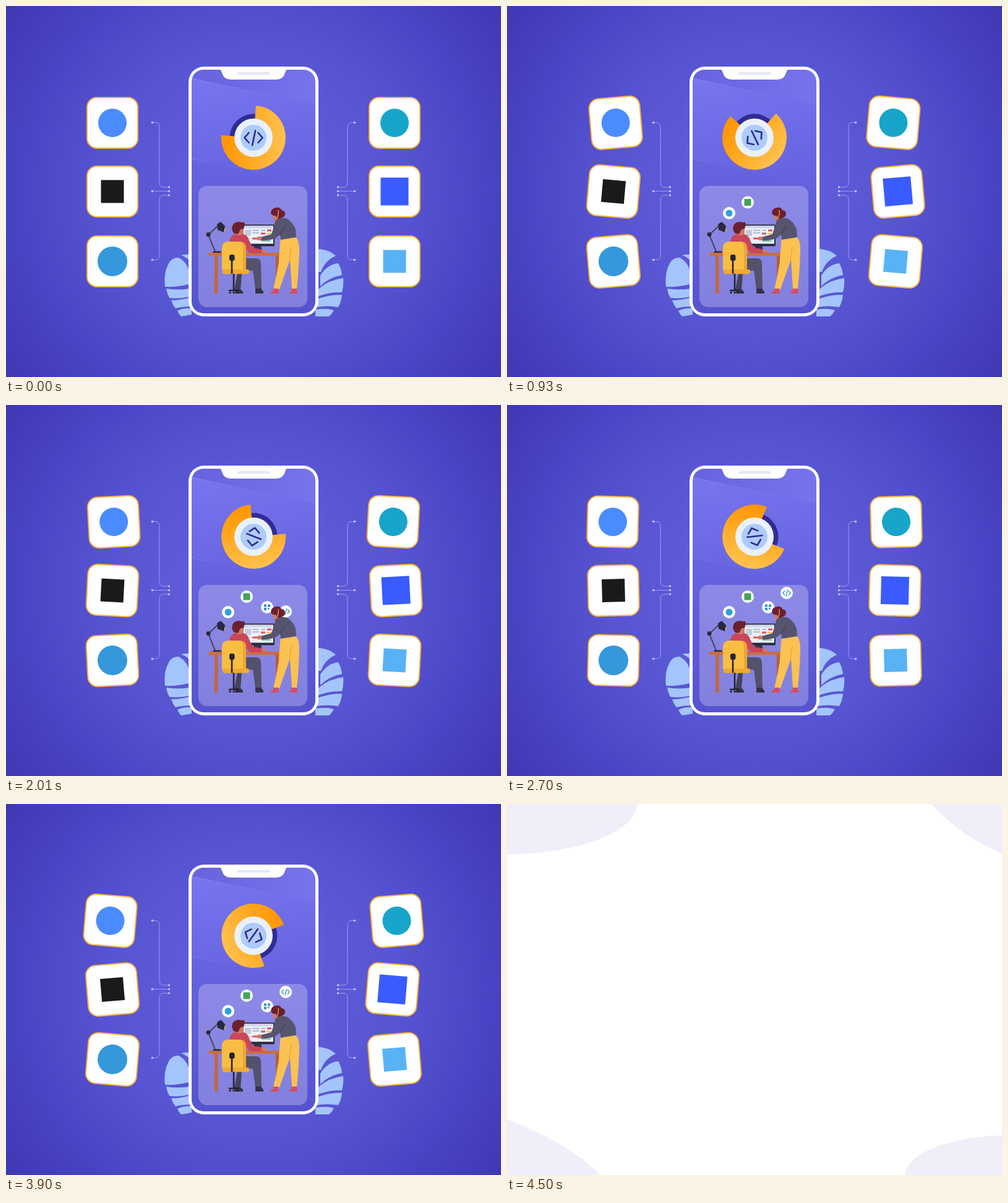
Write an HTML page that moves like this. It is 800 px wide and 600 px high and loops after 9470 ms.

```html
<!DOCTYPE html>
<html lang="en">
<head>
<meta charset="utf-8">
<title>App development</title>
<style>
html, body { margin: 0; width: 100%; height: 100%; overflow: hidden; background: #fff; }
svg { display: block; width: 100%; height: 100%; }
.wire { fill: none; stroke: #9c9af0; stroke-width: 1; }
.dot { fill: #c3c2fa; }
.leaf { fill: #a4c5fc; }
</style>
</head>
<body>
<svg viewBox="0 0 800 600">
  <defs>
    <radialGradient id="bg" gradientUnits="userSpaceOnUse" cx="400" cy="300" r="500">
      <stop offset="0" stop-color="#6462df"/>
      <stop offset=".48" stop-color="#5754d2"/>
      <stop offset=".76" stop-color="#4944c3"/>
      <stop offset="1" stop-color="#3f38b3"/>
    </radialGradient>
    <linearGradient id="top" x1="0" y1="0" x2="1" y2="0">
      <stop offset="0" stop-color="#6763df"/><stop offset="1" stop-color="#7674ed"/>
    </linearGradient>
    <linearGradient id="mid" x1="0" y1="0" x2=".2" y2="1">
      <stop offset="0" stop-color="#7875ef"/><stop offset="1" stop-color="#6663df"/>
    </linearGradient>
    <linearGradient id="low" x1="0" y1="0" x2="0" y2="1">
      <stop offset="0" stop-color="#6764e0"/><stop offset="1" stop-color="#5653d0"/>
    </linearGradient>
    <linearGradient id="gold" gradientUnits="userSpaceOnUse" x1="-52" y1="0" x2="52" y2="0">
      <stop offset="0" stop-color="#ff9500"/><stop offset="1" stop-color="#ffc24d"/>
    </linearGradient>
    <clipPath id="screen"><rect x="300" y="103" width="200" height="394" rx="19"/></clipPath>
    <g id="wires">
      <path class="wire" d="M236 188.500h5q7 0 7 7V286q0 7 7 7h9M236 299.500h28M264 306h-9q-7 0-7 7v90.500q0 7-7 7h-5"/>
      <g class="dot">
        <circle cx="236.500" cy="188.500" r="1.700"/><circle cx="263.500" cy="293" r="1.700"/>
        <circle cx="236.500" cy="299.500" r="1.700"/><circle cx="263.500" cy="299.500" r="1.700"/>
        <circle cx="263.500" cy="306" r="1.700"/><circle cx="236.500" cy="410.500" r="1.700"/>
      </g>
    </g>
    <path id="code" d="M-7.500-8L-14.500 0l7 8M7.500-8L14.500 0l-7 8M3-11.500L-2 12.500" fill="none" stroke-linecap="round" stroke-linejoin="round"/>
  </defs>

  <g id="scene">
    <rect width="800" height="600" fill="url(#bg)"/>

    <g class="leaf">
      <path d="M283 403q9-2 17-1v14q-6-9-17-13z"/>
      <path d="M257 454q-3-24 8-41q6-7 14-6q15 8 17 25l-1 18q-18 5-38 4z"/>
      <path d="M259 457q18 3 38 0v13q-17 4-33 2q-4-7-5-15z"/>
      <path d="M267 476q15 0 32-5v15q-15 0-25 3q-5-6-7-13z"/>
      <path d="M277 493q10-5 23-4v10q-9 2-17 3q-4-4-6-9z"/>
      <path d="M500 393q20-1 33 11q-18 8-24 26h-9z"/>
      <path d="M508 436q11-18 29-20q5 9 6 19q-21 4-35 18z"/>
      <path d="M503 460q15-16 42-20q1 13-2 23q-20-1-40 7z"/>
      <path d="M503 474q18-7 40-7q-1 11-6 20q-18-3-34 0z"/>
      <path d="M500 491q18-3 30 1q-3 6-8 10h-22z"/>
    </g>

    <use href="#wires"/>
    <use href="#wires" transform="translate(800) scale(-1 1)"/>

    <rect x="295" y="98" width="210" height="404" rx="25" fill="#fff"/>
    <g clip-path="url(#screen)">
      <path d="M300 100h200v60L300 117z" fill="url(#top)"/>
      <path d="M300 117l200 42v136L300 247z" fill="url(#mid)"/>
      <path d="M300 247l200 46v205H300z" fill="url(#low)"/>
    </g>
    <path d="M345 101h110q-3 3-4 7q-3 11-14 11h-74q-11 0-14-11q-1-4-4-7z" fill="#fff"/>
    <rect x="374" y="107" width="53" height="4" rx="2" fill="#e4e7f8"/>

    <g transform="translate(400 213)">
      <g id="ring">
        <circle r="38.500" fill="#302c94"/>
        <path d="M4-52A52 52 0 1 1-52-4L-30-2.300A30 30 0 1 0 2.300-30z" fill="url(#gold)"/>
      </g>
      <circle r="31" fill="#eaf1fd"/>
      <circle r="21" fill="#adcbfb"/>
      <g id="sign"><use href="#code" stroke="#2c2a88" stroke-width="2.600"/></g>
    </g>

    <rect x="311" y="291" width="176" height="196" rx="14" fill="#fff" fill-opacity=".26"/>
    <g id="bubbles"></g>

    <!-- monitor -->
    <path d="M401 387h11l2 10h-15z" fill="#34334a"/>
    <rect x="382" y="353.500" width="52" height="35" rx="2" fill="#29283d"/>
    <rect x="384" y="355.500" width="48" height="29" fill="#edf1f8"/>
    <rect x="384" y="355.500" width="48" height="4" fill="#cdd8ec"/>
    <rect x="386" y="362" width="10" height="10" fill="#c3cbdc"/>
    <path d="M398 363h11M398 367h11M413 363h6" stroke="#aebbd6" stroke-width="2"/>
    <path d="M412 368h7M422 363h7M398 376h9" stroke="#df5262" stroke-width="3"/>
    <path d="M421 368h9M386 376h8" stroke="#f4bd4f" stroke-width="2"/>
    <path d="M413 375h8M413 380h15" stroke="#7cc3a8" stroke-width="2"/>

    <!-- desk and lamp -->
    <rect x="337" y="403" width="5.500" height="62" fill="#c4653c"/>
    <rect x="436" y="403" width="5" height="52" fill="#b95c38"/>
    <rect x="327" y="399" width="115" height="5" fill="#cb6e42"/>
    <path d="M338 397l-11-27l17-16" fill="none" stroke="#46445c" stroke-width="2"/>
    <circle cx="327" cy="369.500" r="3.500" fill="#29283d"/>
    <path d="M341 353l6-4l7 7q2 6-2 10l-10-4z" fill="#29283d"/>
    <path d="M354 357q2 5-2 9z" fill="#f7d27c"/>
    <path d="M334 399q0-2.500 3-2.500h8q3 0 3 2.500z" fill="#29283d"/>

    <!-- seated man -->
    <path d="M374 432l7-14h12l-12 16l-2 25h-10z" fill="#454359"/>
    <path d="M380 408h24q8 0 8 9l1 41h-10l-4-30h-23z" fill="#53516b"/>
    <path d="M403 457h9l4 5v3h-13zM370 458h9l4 4v3h-13z" fill="#343248"/>
    <path d="M371 361h13v9q-2 5-7 5t-8-5z" fill="#cf7a62"/>
    <path d="M367 366q-4-8 1-14q6-5 13-2q5-2 5 4l-2 6q-6-1-8 8q-5 2-9-2z" fill="#6d1f30"/>
    <path d="M361 383q0-11 9-14q7 4 13 0q7 1 9 8l7 14l18 3v6h-23l-7-8v19h-22z" fill="#cb455b"/>
    <path d="M413 394h5q4 2 2 5h-7z" fill="#cf7a62"/>

    <!-- chair -->
    <path d="M349 392q0-11 11-11h16q12 0 12 11v35h-39z" fill="#f9bd43"/>
    <path d="M380 382q8 2 8 10v35h-5v-36q0-6-3-9z" fill="#eda62f"/>
    <rect x="350" y="426" width="43" height="7.500" rx="3" fill="#f0aa32"/>
    <path d="M365 406v27M368 433v28M360 460h16" fill="none" stroke="#242338" stroke-width="2.600"/>
    <rect x="361" y="402" width="8.500" height="10" rx="3" fill="#242338"/>
    <g fill="#242338"><circle cx="362" cy="463.500" r="1.700"/><circle cx="368" cy="463.500" r="1.700"/><circle cx="374.500" cy="463.500" r="1.700"/></g>

    <!-- standing woman -->
    <path d="M444 374h25q6 8 5 24q-1 32-4 60h-8l-3-48l-17 48h-10q6-25 9-45q1-22 3-39z" fill="#fbc152"/>
    <path d="M458 410l3-20" stroke="#e8a838" stroke-width="1.500"/>
    <path d="M432 457h8l1 8h-14q0-3 5-4zM461 457h9l1 8h-13q0-3 4-4z" fill="#d64c60"/>
    <path d="M431 338h14v9q-4 4-11 1z" fill="#cf7a62"/>
    <path d="M428 335q0-8 9-9q6-1 8 4q6 1 6 6t-6 7q-4 3-7 0l-2-4q-6 1-8-4z" fill="#6d1f30"/>
    <path d="M440 330q1 8-2 13" fill="none" stroke="#e9a73a" stroke-width="1.300"/>
    <path d="M436 346q9-5 18-2q9 5 14 17l1 13l-25 4l-1-8l-8 6q-13 4-24 3v-5l18-5q4-12 7-23z" fill="#56546e"/>
    <path d="M443 370l8-14" stroke="#42405a" stroke-width="1.300"/>
    <path d="M413 373l-6 0q-3 3 0 6h6z" fill="#cf7a62"/>

    <g id="tiles"></g>
  </g>

  <g id="card" display="none">
    <rect width="800" height="600" fill="#fff"/>
    <path fill="#f0eef8" d="M0 0H210A210 81 0 0 1 0 81zM686 0Q728 48 800 81V0zM0 510Q98 547 151 600H0zM644 600C644 566 712 539 800 536V600z"/>
  </g>
</svg>

<script>
const LOOP = 9470, SCENE = 4500, STEP = 30;
const $ = id => document.getElementById(id);

function add(parent, tag, attrs) {
  const el = document.createElementNS('http://www.w3.org/2000/svg', tag);
  for (const k in attrs) el.setAttribute(k, attrs[k]);
  return parent.appendChild(el);
}
const square = (g, size, rx, fill) =>
  add(g, 'rect', { x: -size / 2, y: -size / 2, width: size, height: size, rx, fill });

// pivot: offset of the turning point above the tile centre
const tiles = [
  { x: 172, y: 189, dir: -1, pivot: 42, shape: 'circle', size: 46, fill: '#4a8cff' },
  { x: 172, y: 300, dir: 1, pivot: 0, shape: 'square', size: 37, fill: '#1a1a1a' },
  { x: 172, y: 413, dir: -1, pivot: 0, shape: 'circle', size: 48, fill: '#3498db' },
  { x: 628, y: 189, dir: 1, pivot: 42, shape: 'circle', size: 46, fill: '#17a5c9' },
  { x: 628, y: 300, dir: -1, pivot: 42, shape: 'square', size: 45, fill: '#3a5bff' },
  { x: 628, y: 413, dir: 1, pivot: 0, shape: 'square', size: 37, fill: '#58b3f5' }
];
for (const t of tiles) {
  const g = t.el = add($('tiles'), 'g', {});
  const box = square(g, 82, 16, '#fff');
  box.setAttribute('stroke', '#ffb23e');
  box.setAttribute('stroke-width', 2);
  if (t.shape === 'circle') add(g, 'circle', { r: t.size / 2, fill: t.fill });
  else square(g, t.size, 0, t.fill);
}

const bubbles = [
  { x: 359, from: 397, to: 335, start: 0,
    draw: g => add(g, 'circle', { r: 5.5, fill: '#2f9fe0' }) },
  { x: 389, from: 374, to: 310, start: 600,
    draw: g => square(g, 11, 0, '#43a457') },
  { x: 422, from: 378, to: 327, start: 1240,
    draw: g => add(g, 'path', { d: 'M-5-4.500h4v4h-4zM1-4.500h4v4h-4zM-5 1h4v4h-4zM1 1h2.500v2.500h-2.500z', fill: '#2a8fd0' }) },
  { x: 452, from: 364, to: 304, start: 1800,
    draw: g => add(g, 'use', { href: '#code', transform: 'scale(.43)', stroke: '#2a8fc4', 'stroke-width': 3 }) }
];
for (const b of bubbles) {
  b.el = add($('bubbles'), 'g', {});
  add(b.el, 'circle', { r: 10, fill: '#fff' });
  b.draw(b.el);
}

const swing = [[0, 0], [1350, 7.2], [3600, -7.2], [SCENE, 0]];

function along(keys, t) {
  let i = 1;
  while (i < keys.length - 1 && t > keys[i][0]) i++;
  const [t0, a] = keys[i - 1], [t1, b] = keys[i];
  return a + (b - a) * (t - t0) / (t1 - t0);
}
const ease = p => p * p * (3 - 2 * p);
const clamp = p => Math.max(0, Math.min(1, p));

function render(time) {
  const t = Math.floor((time % LOOP) / STEP) * STEP;
  const ended = t >= SCENE;
  $('card').setAttribute('display', ended ? 'inline' : 'none');
  $('scene').setAttribute('display', ended ? 'none' : 'inline');
  if (ended) return;

  const turn = 180 * t / SCENE;
  $('ring').setAttribute('transform', `rotate(${turn})`);
  $('sign').setAttribute('transform', `rotate(${-turn})`);

  const angle = along(swing, t);
  for (const { el, x, y, dir, pivot } of tiles)
    el.setAttribute('transform', `translate(${x} ${y}) rotate(${dir * angle} 0 ${-pivot})`);

  for (const { el, x, from, to, start } of bubbles) {
    const p = ease(clamp((t - start) / 420));
    el.setAttribute('display', t > start ? 'inline' : 'none');
    el.setAttribute('transform', `translate(${x} ${from + (to - from) * p})`);
  }
}

let begin;
function tick(now) {
  begin ??= now;
  render(now - begin);
  requestAnimationFrame(tick);
}
render(0);
requestAnimationFrame(tick);
</script>
</body>
</html>
```
